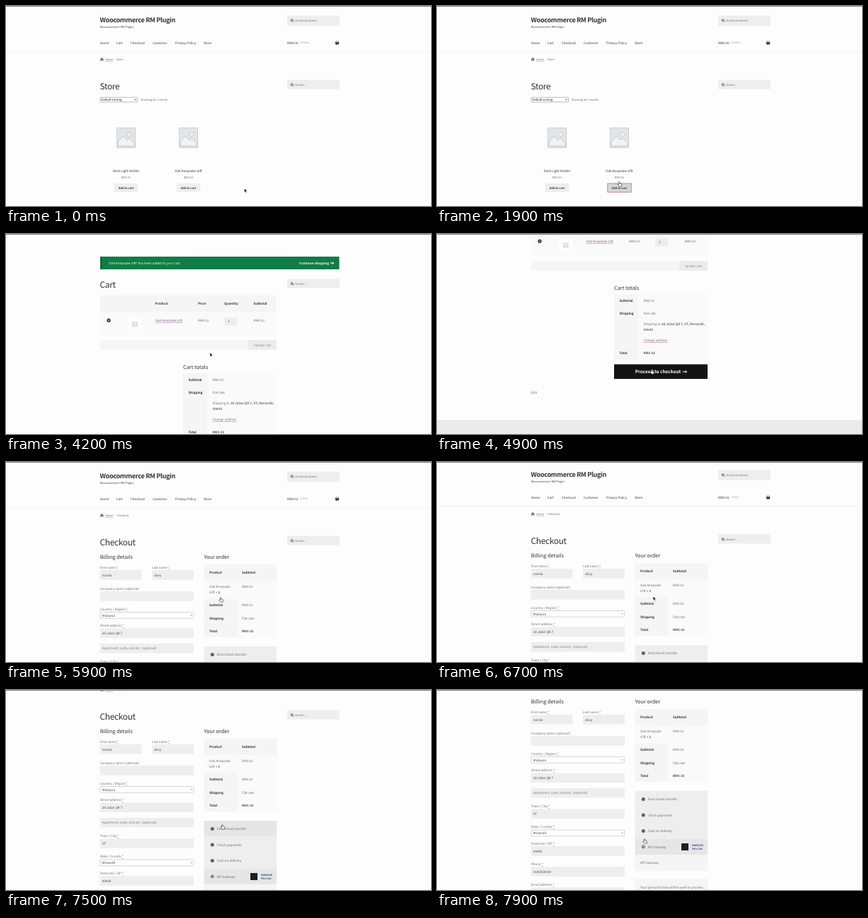
These frames come from a looping animation (600 px wide and 283 px high, 8 s). An HTML page:

```html
<!DOCTYPE html>
<html lang="en">
<head>
<meta charset="utf-8">
<title>Store checkout</title>
<style>
  html, body { margin: 0; width: 100%; height: 100%; overflow: hidden; background: #fdfdfd; }
  svg { display: block; width: 100vw; height: 100vh; }
  text { font-family: "Noto Sans CJK SC", "Noto Sans CJK JP", "Noto Sans", sans-serif; text-rendering: geometricPrecision; white-space: pre; }
  .punct { font-family: "Open Sans", "Noto Sans", sans-serif; font-size: .95em; }
</style>
</head>
<body>
<svg id="stage" viewBox="0 0 600 283" xmlns="http://www.w3.org/2000/svg"></svg>
<script>
const DARK = '#333', GREY = '#6d6d6d', LINK = '#96588a';
const FIELD = '#eeeeee', HEAD = '#f5f5f5', CELL = '#fafafa';
const FONT_SCALE = 0.2844; // page pixels to stage units

const GIFT = 'Oak Keepsake Gift', LAMP = 'Desk Light Holder', GATEWAY = 'MP Gateway';
const STREET = '28 Jalan QK 7', STATE = 'Merandil', TOWN = 'VT', POSTCODE = '99640';

// y is the vertical centre of the capital letters
function text(x, y, str, fill = GREY, px = 16, weight = 400, attrs = '') {
  const size = px * FONT_SCALE;
  const body = str.replace(/[“”…×›]/g, '<tspan class="punct">$&</tspan>');
  return `<text x="${x}" y="${y + size * 0.366}" font-size="${size}" fill="${fill}" font-weight="${weight}" ${attrs}>${body}</text>`;
}
const bold = (x, y, str, fill = DARK, px = 16, attrs = '') => text(x, y, str, fill, px, 600, attrs);
const heading = (x, y, str) => text(x, y, str, DARK, 25.9, 300);
const pageTitle = (y, str) => text(132.5, y, str, DARK, 41.9, 300, 'letter-spacing="-.317"');
const link = (x, y, str, fill = LINK, px = 16) => text(x, y, str, fill, px, 400, 'text-decoration="underline"');
const rect = (x, y, w, h, fill, attrs = '') => `<rect x="${x}" y="${y}" width="${w}" height="${h}" fill="${fill}" ${attrs}/>`;
const path = (d, stroke, width = 0.8, attrs = '') => `<path d="${d}" fill="none" stroke="${stroke}" stroke-width="${width}" ${attrs}/>`;
const circle = (x, y, r, fill, attrs = '') => `<circle cx="${x}" cy="${y}" r="${r}" fill="${fill}" ${attrs}/>`;
const arrow = (x, y, w) => path(`M${x} ${y}h${w}m-2 -1.6l2 1.6l-2 1.6`, '#fff', 1);

function searchBox(y, label) {
  return rect(397, y, 73.5, y < 50 ? 14.5 : 13, FIELD)
    + circle(403.6, y + 6.6, 1.4, 'none', `stroke="${DARK}" stroke-width=".8"`)
    + path(`M404.6 ${y + 7.6}l1.4 1.4`, DARK, 0.9)
    + text(408, y + (y < 50 ? 7.4 : 6.6), label, GREY, 14);
}

function header(crumb, total, count) {
  const menu = { Home: 132.7, Cart: 155.5, Checkout: 175.8, Customer: 207, 'Privacy Policy': 238.8, Store: 279 };
  return bold(132.5, 20, 'Woocommerce RM Plugin', DARK, 32, 'letter-spacing="-.317"')
    + text(132.7, 29.3, 'Woocommerce RM Plugin', '#404040', 14)
    + searchBox(13.5, 'Search products…')
    + Object.entries(menu).map(([name, x]) => text(x, 52, name, DARK)).join('')
    + text(397, 52, total, DARK) + text(415, 52, count, '#a0a0a0', 14)
    + `<path d="M464.6 51.2h5.8l-.8 3.4h-4.2z" fill="${DARK}"/>` + path('M465.4 51.2l1.2-2m2.9 2l-1.2-2', DARK, 0.7)
    + rect(0, 64.3, 600, 0.6, '#ececec')
    + `<path d="M132.6 75.6l2.7-2.5 2.7 2.5h-.8v2.3h-1.3v-1.6h-1.2v1.6h-1.3v-2.3z" fill="${GREY}"/>`
    + link(140, 75.5, 'Home', GREY, 14) + text(153.2, 75.5, '›', '#aaa', 14) + text(156, 75.5, crumb, GREY, 14);
}

function placeholder(x, y) {
  return `<g transform="translate(${x} ${y})">`
    + rect(0.4, 0.4, 26, 28, '#e1e5e8', 'stroke="#c3c9cd" stroke-width=".8"')
    + circle(18, 9.6, 2.8, '#f4f6f7', 'stroke="#b5bcc1" stroke-width=".7"')
    + '<path d="M2 20l7-8 6 6 3-3 7 7v4H2z" fill="#f1f3f4" stroke="#b5bcc1" stroke-width=".7"/>'
    + '</g>';
}

function product(cx, name, price, id) {
  const middle = 'text-anchor="middle"';
  return placeholder(cx - 13.3, 172)
    + text(cx, 233, name, DARK, 16, 400, middle)
    + text(cx, 242.5, price, GREY, 14, 400, middle)
    + rect(cx - 16.7, 251, 33.4, 12.4, FIELD, id)
    + bold(cx, 257.2, 'Add to cart', DARK, 14, middle);
}

function storePage() {
  return header('Store', 'RM0.00', '0 items') + pageTitle(113.5, 'Store') + searchBox(104.5, 'Search …')
    + rect(133, 129.3, 52.5, 6.6, '#fff', 'stroke="#767676" stroke-width=".5" rx=".6"')
    + text(134.6, 132.7, 'Default sorting', '#111', 14.7) + path('M181.3 131.9l1.2 1.3 1.2-1.3', '#111', 0.7)
    + text(190, 132.8, 'Showing all 2 results', GREY, 14)
    + product(169.5, LAMP, 'RM0.01', '') + product(257.5, GIFT, 'RM0.02', 'id="addButton"');
}

function cartPage() {
  const columns = { Product: 210.5, Price: 271, Quantity: 308, Subtotal: 349.5 };
  return header('Cart', 'RM0.02', '1 item')
    + rect(133, 118, 337.5, 18, '#0f7d45') + rect(133, 118, 3, 18, '#0c6b3b')
    + text(144, 127.2, `“${GIFT}” has been added to your cart.`, '#fff')
    + bold(413.7, 127.2, 'Continue shopping', '#fff') + arrow(458, 127.2, 4.6)
    + pageTitle(158, 'Cart') + searchBox(149.5, 'Search …')
    + rect(133, 172.5, 249, 23.5, HEAD) + rect(133, 196, 249, 32.5, CELL)
    + Object.entries(columns).map(([name, x]) => bold(x, 184.5, name)).join('')
    + circle(145, 208.2, 2.6, DARK) + path('M144.1 207.3l1.8 1.8m0-1.8l-1.8 1.8', '#fff', 0.6)
    + rect(171.5, 204, 20.5, 20, '#fdfdfd')
    + rect(178.8, 210.8, 6.2, 6, '#f0f0f0', 'stroke="#c4c4c4" stroke-width=".7"') + path('M179.4 215.6l2-2 1.2 1 .9-.8 1.2 1.4', '#bbb', 0.6)
    + link(210.5, 208.3, GIFT) + text(271, 208.3, 'RM0.02') + text(349.5, 208.3, 'RM0.02')
    + rect(308, 203.7, 18.4, 12, FIELD) + text(313.2, 209.8, '1', '#43454b')
    + rect(133, 236, 249, 14, HEAD) + rect(342, 236, 40, 14, '#ececec')
    + text(362, 243.2, 'Update cart', '#888', 16, 500, 'text-anchor="middle"')
    + heading(250, 274.5, 'Cart totals')
    + rect(250, 283, 34, 93, HEAD) + rect(284, 283, 98, 93, CELL)
    + bold(257.5, 292.7, 'Subtotal') + text(291.5, 292.7, 'RM0.02')
    + bold(257.5, 310.7, 'Shipping') + text(291.5, 310.7, 'Flat rate')
    + text(291.5, 325.7, `Shipping to <tspan font-weight="600">${STREET}, ${TOWN}, ${STATE},</tspan>`)
    + bold(291.5, 333.3, `${POSTCODE}.`, GREY) + link(291.5, 348.6, 'Change address')
    + bold(257.5, 366.7, 'Total') + bold(291.5, 366.7, 'RM0.02', '#555')
    + rect(250, 382.4, 132, 20.6, DARK, 'id="checkoutButton"')
    + bold(279.7, 392.9, 'Proceed to checkout', '#fff', 22.65) + arrow(346.5, 392.9, 6)
    + text(132.7, 422.5, 'Edit') + rect(0, 461, 600, 20, '#ebebeb');
}

const required = name => `${name} <tspan fill="#e2401c" text-decoration="underline">*</tspan>`;
const field = (x, y, w, label, value, fill = '#43454b') =>
  text(x, y, label) + rect(x, y + 4, w, 13.6, FIELD) + text(x + 3, y + 11, value, fill);
const picker = (y, label, value) => text(132.7, y, required(label))
  + rect(132.9, y + 4.5, 131.8, 8.7, '#fff', 'stroke="#aaa" stroke-width=".5" rx="1"')
  + text(135.7, y + 9, value, '#444') + '<path d="M260.4 ' + (y + 8.3) + 'h2.4l-1.2 1.5z" fill="#888"/>';

const METHOD_TOP = 261, METHOD_HEIGHT = 22.5;
function paymentMethods() {
  return ['Direct bank transfer', 'Check payments', 'Cash on delivery', GATEWAY].map((name, i) => {
    const top = METHOD_TOP + i * METHOD_HEIGHT, y = top + 11.4, chosen = i === 3;
    return rect(279.5, top, 102.7, METHOD_HEIGHT, chosen ? '#e6e6e6' : FIELD, chosen ? '' : 'class="method"')
      + (chosen ? circle(291.3, y, 2, '#fff', 'stroke="#7d3f62" stroke-width="1"') + circle(291.3, y, 1, '#7d3f62')
                : circle(291.3, y, 2.5, '#606060'))
      + text(297.5, y, name);
  }).join('');
}

function checkoutPage() {
  const x = 132.7, full = 132.3;
  return header('Checkout', 'RM0.02', '1 item') + pageTitle(113.3, 'Checkout') + searchBox(104.5, 'Search …')
    + heading(x, 134, 'Billing details') + heading(279.5, 134, 'Your order')
    + field(x, 149, 58.8, required('First name'), 'norela') + field(206, 149, 59, required('Last name'), 'dovy')
    + field(x, 179, full, 'Company name (optional)', '')
    + picker(208, 'Country / Region', 'Malaysia')
    + field(x, 231.5, full, required('Street address'), STREET)
    + field(x, 252.8, full, '', 'Apartment, suite, unit etc. (optional)', '#777')
    + field(x, 282.3, full, required('Town / City'), TOWN)
    + picker(311.5, 'State / County', STATE)
    + field(x, 335.2, full, required('Postcode / ZIP'), POSTCODE)
    + field(x, 364.2, full, required('Phone'), '0105550000')
    + field(x, 393.5, full, required('Email address'), '')
    + rect(279.5, 145, 102.7, 23, HEAD) + rect(279.5, 168, 102.7, 80, CELL) + rect(279.5, 193.5, 46.5, 54.5, HEAD)
    + bold(287, 156.7, 'Product') + bold(333, 156.7, 'Subtotal')
    + text(287, 176.6, 'Oak Keepsake') + text(287, 184.5, 'Gift') + bold(296, 184.5, '× 1', '#555') + text(333, 176.6, 'RM0.02')
    + bold(287, 202.7, 'Subtotal') + text(333, 202.7, 'RM0.02')
    + bold(287, 221, 'Shipping') + text(333, 221, 'Flat rate')
    + bold(287, 239, 'Total') + bold(333, 239, 'RM0.02', '#555')
    + paymentMethods()
    + rect(345, 335, 10, 10, '#1d1d2b')
    + bold(360, 338, 'MARBLED', '#2c4a86', 12) + bold(360, 342.3, 'PELICAN', '#2c4a86', 12)
    + rect(279.5, 351, 102.7, 23, HEAD) + text(287, 362, GATEWAY)
    + rect(279.5, 385, 102.7, 40, HEAD) + text(287, 397.6, 'Your personal data will be used to process');
}

const stage = document.getElementById('stage');
stage.innerHTML = [storePage, cartPage, checkoutPage].map(page => `<g class="page">${page()}</g>`).join('')
  + rect(0, 0, 600, 0.9, '#777')
  + '<path id="arrow" d="M0 0V5.2l1.2-1.1.9 2 .9-.4-.9-1.9h1.7z" fill="#000" stroke="#fff" stroke-width=".4"/>'
  + '<path id="hand" d="M-.7 4V.5q.7-.9 1.4 0v2l2.4.6q.6.3.5 1L3 6.6H0L-2.2 4q0-.9.8-.6z" fill="#fff" stroke="#222" stroke-width=".6"/>';

const byId = id => document.getElementById(id);
const pages = stage.querySelectorAll('.page'), methods = stage.querySelectorAll('.method');
const show = (node, on) => node.setAttribute('visibility', on ? 'visible' : 'hidden');
const between = (t, from, to) => t >= from && t < to;

// keys are [time, value]
function track(keys, t) {
  const next = keys.findIndex(key => key[0] > t);
  if (next < 0) return keys[keys.length - 1][1];
  if (next === 0) return keys[0][1];
  const [t0, a] = keys[next - 1], [t1, b] = keys[next];
  return a + (b - a) * (t - t0) / (t1 - t0);
}

const cursorX = [[200, 336.7], [500, 322], [800, 280], [1100, 258], [1800, 258], [2700, 252], [3500, 252], [4200, 288], [4500, 290], [4800, 303], [5900, 303], [6200, 305.3], [7500, 305.3], [7900, 293]];
const cursorY = [[200, 258.3], [500, 261], [1100, 256.5], [1800, 256.5], [2200, 225], [2700, 170.5], [3500, 170.5], [4200, 168], [4500, 171], [4800, 191.5], [5900, 191.5], [6200, 190.3], [7500, 190.3], [7900, 210.6]];
const cartScroll = [[3500, 0], [3700, 10], [4200, 86], [4400, 158], [4500, 182], [4700, 198]];
const checkoutScroll = [[6600, 0], [6700, 2], [7200, 37], [7500, 76], [7700, 104], [7900, 118]];

function setButton(button, hovered, focused, hoverFill, fill) {
  button.setAttribute('fill', hovered ? hoverFill : fill);
  button.setAttribute('stroke', focused ? LINK : 'none');
  button.setAttribute('stroke-width', 0.6);
}

function draw(now) {
  const t = Math.floor((now % 8000) / 100) * 100;
  const current = t < 2800 ? 0 : t < 5900 ? 1 : 2;
  const scroll = [0, track(cartScroll, t), track(checkoutScroll, t)][current];
  pages.forEach((page, i) => show(page, i === current));
  pages[current].setAttribute('transform', `translate(0 ${-scroll})`);

  const x = track(cursorX, t), y = track(cursorY, t);
  const pointing = between(t, 1000, 2600) || between(t, 4700, 6400) || t >= 7500;
  for (const id of ['arrow', 'hand']) {
    byId(id).setAttribute('transform', `translate(${x} ${y})`);
    show(byId(id), (id === 'hand') === pointing);
  }

  setButton(byId('addButton'), between(t, 1000, 2000), between(t, 1700, 2800), '#d5d5d5', FIELD);
  setButton(byId('checkoutButton'), between(t, 4700, 5900), between(t, 5300, 5900), '#141414', DARK);
  methods.forEach((row, i) => {
    const top = METHOD_TOP + i * METHOD_HEIGHT;
    row.setAttribute('fill', between(y + scroll, top, top + METHOD_HEIGHT) ? '#e6e6e6' : FIELD);
  });
  requestAnimationFrame(draw);
}
draw(0);
</script>
</body>
</html>
```
